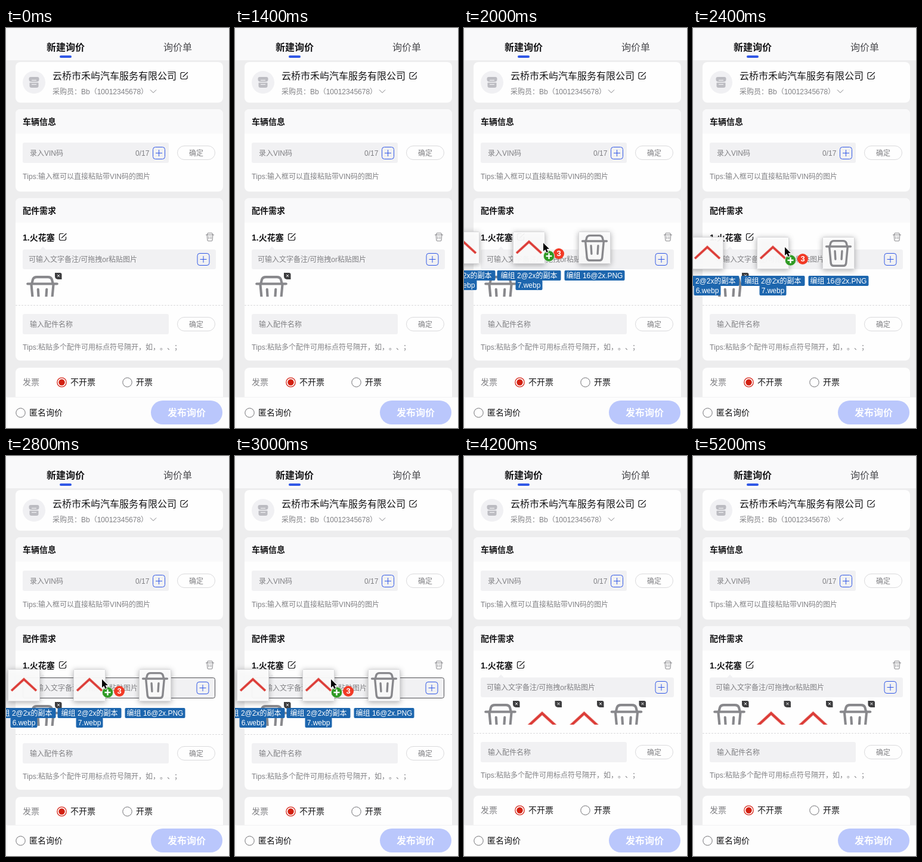
Animation, 374 px wide and 670 px high, one loop 5400 ms. Source, as an HTML page with a canvas:

```html
<!DOCTYPE html>
<html lang="zh-CN">
<head>
<meta charset="utf-8">
<title>新建询价</title>
<style>
html, body { margin: 0; width: 100%; height: 100%; overflow: hidden; background: #ededee; }
canvas { display: block; width: 374px; height: 670px; text-spacing-trim: space-all; }
</style>
</head>
<body>
<canvas id="stage"></canvas>
<script>
const W = 374, H = 670, LOOP = 5400, STEP = 200;
const FONT = '"Liberation Sans", "Noto Sans CJK SC", "Noto Sans CJK", sans-serif';
const C = {
  page: '#ededee', card: '#fefefe', head: '#f9f9fa', field: '#f1f1f3',
  line: '#dadadc', ink: '#141416', dim: '#808084', icon: '#88888c',
  blue: '#3158e6', red: '#d62a1e', label: '#1d66ae', badge: '#3e3e40'
};
const canvas = document.getElementById('stage');
const ctx = canvas.getContext('2d');
const ratio = window.devicePixelRatio || 1;
canvas.width = W * ratio;
canvas.height = H * ratio;

function text(str, x, cy, size, color, bold, align) {
  ctx.font = (bold ? 'bold ' : '') + size + 'px ' + FONT;
  ctx.fontKerning = 'none';
  ctx.fillStyle = color;
  ctx.textAlign = align || 'left';
  ctx.fillText(str, x, Math.round(cy + size * 0.38));
}

function box(x, y, w, h, r, fill, stroke) {
  ctx.beginPath();
  ctx.roundRect(x, y, w, h, r);
  if (fill) { ctx.fillStyle = fill; ctx.fill(); }
  if (stroke) { ctx.strokeStyle = stroke; ctx.lineWidth = 1; ctx.stroke(); }
}

function disc(x, y, r, fill, stroke, width) {
  ctx.beginPath();
  ctx.arc(x, y, r, 0, Math.PI * 2);
  if (fill) { ctx.fillStyle = fill; ctx.fill(); }
  if (stroke) { ctx.strokeStyle = stroke; ctx.lineWidth = width || 1; ctx.stroke(); }
}

function line(points, color, width) {
  ctx.beginPath();
  points.forEach(([x, y], i) => i ? ctx.lineTo(x, y) : ctx.moveTo(x, y));
  ctx.strokeStyle = color;
  ctx.lineWidth = width;
  ctx.stroke();
}

function at(x, y, scale, draw) {
  ctx.save();
  ctx.translate(x, y);
  ctx.scale(scale, scale);
  draw();
  ctx.restore();
}

// Bin with its lid on the x axis, 50 units wide
function bin(x, y, scale, width) {
  at(x, y, scale, () => {
    ctx.lineCap = ctx.lineJoin = 'round';
    line([[-24, 0], [24, 0]], C.icon, width);
    ctx.beginPath();
    ctx.moveTo(-17, -1);
    ctx.lineTo(-15.5, -7);
    ctx.quadraticCurveTo(-14, -11, -9, -11);
    ctx.lineTo(9, -11);
    ctx.quadraticCurveTo(14, -11, 15.5, -7);
    ctx.lineTo(17, -1);
    ctx.moveTo(-18, 1);
    ctx.lineTo(-15, 33);
    ctx.quadraticCurveTo(-14, 38, -10, 38);
    ctx.lineTo(10, 38);
    ctx.quadraticCurveTo(14, 38, 15, 33);
    ctx.lineTo(18, 1);
    ctx.stroke();
    line([[-7, 9], [-6, 25]], C.icon, width);
    line([[7, 9], [6, 25]], C.icon, width);
  });
}

function roof(x, y, scale) {
  at(x, y, scale, () => {
    const pts = [[-24, 22], [0, 0], [24, 22]];
    ctx.lineCap = 'butt';
    ctx.lineJoin = 'miter';
    line(pts, '#f0b4ac', 5.4);
    line(pts, '#dc3c38', 3.8);
  });
}

function editIcon(x, y) {
  at(x, y, 1, () => {
    ctx.lineCap = ctx.lineJoin = 'round';
    line([[1, -5.5], [-4, -5.5], [-5.5, -4], [-5.5, 4], [-4, 5.5], [4, 5.5], [5.5, 4], [5.5, 0]], C.ink, 1.2);
    line([[-1.5, 1.5], [6, -5.5]], C.ink, 1.2);
  });
}

function plusBox(x, y) {
  box(x + 0.5, y + 0.5, 20, 20, 4, null, C.blue);
  ctx.lineCap = 'butt';
  line([[x + 5, y + 10.5], [x + 16, y + 10.5]], C.blue, 1);
  line([[x + 10.5, y + 5], [x + 10.5, y + 16]], C.blue, 1);
}

function okButton(cy) {
  box(287.5, cy - 11.5, 63, 23, 11.5, C.card, C.line);
  text('确定', 319, cy, 12, C.dim, false, 'center');
}

function radio(x, y, on) {
  disc(x, y, 7.7, C.card, on ? C.red : '#707074', on ? 1.3 : 1);
  if (on) disc(x, y, 5.2, '#d22010');
}

function card(y, h, headed) {
  box(16, y, 348, h, 8, C.card);
  if (headed) box(16, y, 348, 41, [8, 8, 0, 0], C.head);
}

function header() {
  ctx.fillStyle = C.page;
  ctx.fillRect(0, 0, W, H);
  ctx.fillStyle = C.head;
  ctx.fillRect(0, 0, W, 54);
  line([[1.5, 54], [1.5, 1.5], [374, 1.5]], '#f2f2f3', 1);
  text('新建询价', 68, 32, 16, C.ink, true);
  text('询价单', 264, 32, 16, '#48484c');
  box(90, 46, 20, 4, 2, C.blue);

  card(57, 68);
  disc(47, 91, 19, '#f0f0f3');
  box(38.5, 82, 17, 8, [3, 3, 4, 4], '#bcbcc2');
  box(39.5, 91.5, 15, 8.5, [1, 1, 3, 3], '#bcbcc2');
  line([[43, 87.5], [51, 87.5]], '#f0f0f3', 1.2);
  line([[43, 94.5], [51, 94.5]], '#f0f0f3', 1.2);
  text('云桥市禾屿汽车服务有限公司', 78, 80, 16, C.ink);
  editIcon(298.5, 80);
  text('采购员：Bb（10012345678）', 78, 106, 12, C.dim);
  line([[242, 103.5], [247, 108.5], [252, 103.5]], C.dim, 1);
}

function vehicle() {
  card(136, 138, true);
  text('车辆信息', 28, 157, 14, C.ink, true);
  box(28, 192, 245, 34, 3, C.field);
  text('录入VIN码', 40, 209, 12, C.dim);
  text('0/17', 217, 209, 12, C.dim);
  plusBox(246, 199);
  okButton(209);
  text('Tips:输入框可以直接粘贴带VIN码的图片', 28, 248, 12, C.dim);
}

function thumb(i, kind, dy) {
  const x = 31 + i * 70.5, y = 410 + dy;
  ctx.save();
  ctx.beginPath();
  ctx.rect(x, y, 62, 40);
  ctx.clip();
  if (kind === 'bin') bin(x + 30, y + 18.5, 1.03, 4);
  if (kind === 'roof') roof(x + 29.5, y + 21, 1.03);
  ctx.restore();
  box(x + 51, y, 11.5, 11, [0, 3, 0, 5], C.badge);
  line([[x + 55, y + 3], [x + 59, y + 7]], '#f0f0f0', 1);
  line([[x + 59, y + 3], [x + 55, y + 7]], '#f0f0f0', 1);
}

function parts(hover, thumbs) {
  const d = hover ? 2 : 0;
  card(285, 272 + d, true);
  text('配件需求', 28, 306, 14, C.ink, true);
  text('1.火花塞', 28, 351, 14, C.ink, true);
  editIcon(95, 350);
  bin(342, 346.5, 0.27, 4);

  ctx.beginPath();
  ctx.moveTo(57, 371.5);
  ctx.lineTo(62, 366);
  ctx.lineTo(67, 371.5);
  ctx.fillStyle = C.field;
  ctx.fill();
  if (hover) box(28.5, 371.5, 322, 34, 3, C.field, '#505054');
  else box(28, 371, 324, 33, 3, C.field);
  text('可输入文字备注/可拖拽or粘贴图片', 38 + d / 2, 387 + d / 2, 12, C.dim);
  plusBox(320.5 - d / 2, 377 + d / 2);
  thumbs.forEach((kind, i) => thumb(i, kind, d));

  ctx.setLineDash([3, 2]);
  ctx.lineCap = 'butt';
  line([[16, 464.5 + d], [364, 464.5 + d]], C.line, 1);
  ctx.setLineDash([]);
  box(28, 479 + d, 245, 34, 3, C.field);
  text('输入配件名称', 40, 496 + d, 12, C.dim);
  okButton(496 + d);
  text('Tips:粘贴多个配件可用标点符号隔开，如，。、；', 28, 534 + d, 12, C.dim);

  card(569 + d, 70);
  text('发票', 28, 593 + d, 14, C.dim);
  radio(93.5, 593.5 + d, true);
  text('不开票', 108, 593 + d, 14, C.ink);
  radio(203.5, 593.5 + d, false);
  text('开票', 218, 593 + d, 14, C.ink);
}

function footer() {
  ctx.fillStyle = '#fdfdfd';
  ctx.fillRect(0, 618, W, 52);
  line([[1.5, 670], [1.5, 618.5], [374, 618.5]], '#f2f2f3', 1);
  radio(24.5, 644.5, false);
  text('匿名询价', 39, 644, 14, C.ink);
  box(243, 624, 120, 40, 20, '#bac7fc');
  text('发布询价', 303, 644, 16, '#fdfdff', true, 'center');
}

function tag(str, cx, y, w) {
  box(cx - w / 2, y, w, 17, 2, C.label);
  text(str, cx, y + 8, 12, '#ffffff', false, 'center');
}

function file(x, y, kind, name, w, rest) {
  ctx.save();
  ctx.globalAlpha = 0.93;
  ctx.shadowColor = 'rgba(80,80,84,.5)';
  ctx.shadowBlur = 10 * ratio;
  ctx.shadowOffsetY = 2 * ratio;
  box(x - 27, y - 27, 54, 54, 1, '#fefefe');
  ctx.restore();
  box(x - 26.5, y - 26.5, 53, 53, 1, null, '#d8d8da');
  if (kind === 'bin') bin(x, y - 11, 0.85, 4);
  else roof(x, y - 10, 0.87);
  tag(name, x, y + 38, w);
  if (rest) tag(rest, x, y + 54, 45);
}

function drag(cur, grp) {
  const [x, y] = grp;
  file(x - 110, y, 'roof', '编组 2@2x的副本', 107, '6.webp');
  file(x, y, 'roof', '编组 2@2x的副本', 107, '7.webp');
  file(x + 110, y, 'bin', '编组 16@2x.PNG', 101);
  disc(x + 50, y + 10, 9, '#f23a26');
  text('3', x + 50, y + 9.5, 13, '#ffffff', true, 'center');

  at(cur[0], cur[1], 1, () => {
    disc(9.5, 22, 9.2, '#2f9a24', '#dcead8', 1);
    ctx.lineCap = 'butt';
    line([[4.5, 22], [14.5, 22]], '#ffffff', 2.4);
    line([[9.5, 17], [9.5, 27]], '#ffffff', 2.4);
    ctx.beginPath();
    [[0, 0], [0, 14], [3.2, 11], [5.5, 16], [8, 15], [5.7, 10], [10, 10]]
      .forEach(([px, py]) => ctx.lineTo(px, py));
    ctx.closePath();
    ctx.lineJoin = 'round';
    ctx.strokeStyle = '#ffffff';
    ctx.lineWidth = 2;
    ctx.stroke();
    ctx.fillStyle = '#050505';
    ctx.fill();
  });
}

// Stops: time, cursor, dragged files
const path = [
  [1600, [62, 336], [28, 340]],
  [1800, [107, 352], [78, 357]],
  [2400, [154, 367], [134, 377]],
  [2800, [161, 374], [140, 384]],
  [3000, [161, 374], [140, 384]]
];

function place(t, part) {
  let i = 0;
  while (i < path.length - 2 && t >= path[i + 1][0]) i++;
  const a = path[i], b = path[i + 1];
  const u = Math.min(1, (t - a[0]) / (b[0] - a[0]));
  const e = 1 - (1 - u) * (1 - u);
  return a[part].map((v, k) => Math.round(v + (b[part][k] - v) * e));
}

function render(t) {
  ctx.setTransform(ratio, 0, 0, ratio, 0, 0);
  const thumbs = t < 3200 ? ['bin']
    : ['bin', 'roof', 'roof', t < 3400 ? 'empty' : 'bin'];
  header();
  vehicle();
  parts(t >= 2600 && t < 3200, thumbs);
  footer();
  if (t >= 1600 && t < 3200) drag(place(t, 1), place(t, 2));
  if (t >= 3200 && t < 3400) disc(161.5, 375.5, 9.5, 'rgba(98,98,100,.75)');
}

const start = performance.now();
function tick() {
  const t = (performance.now() - start) % LOOP;
  render(Math.floor(t / STEP) * STEP);
  requestAnimationFrame(tick);
}
tick();
</script>
</body>
</html>
```
